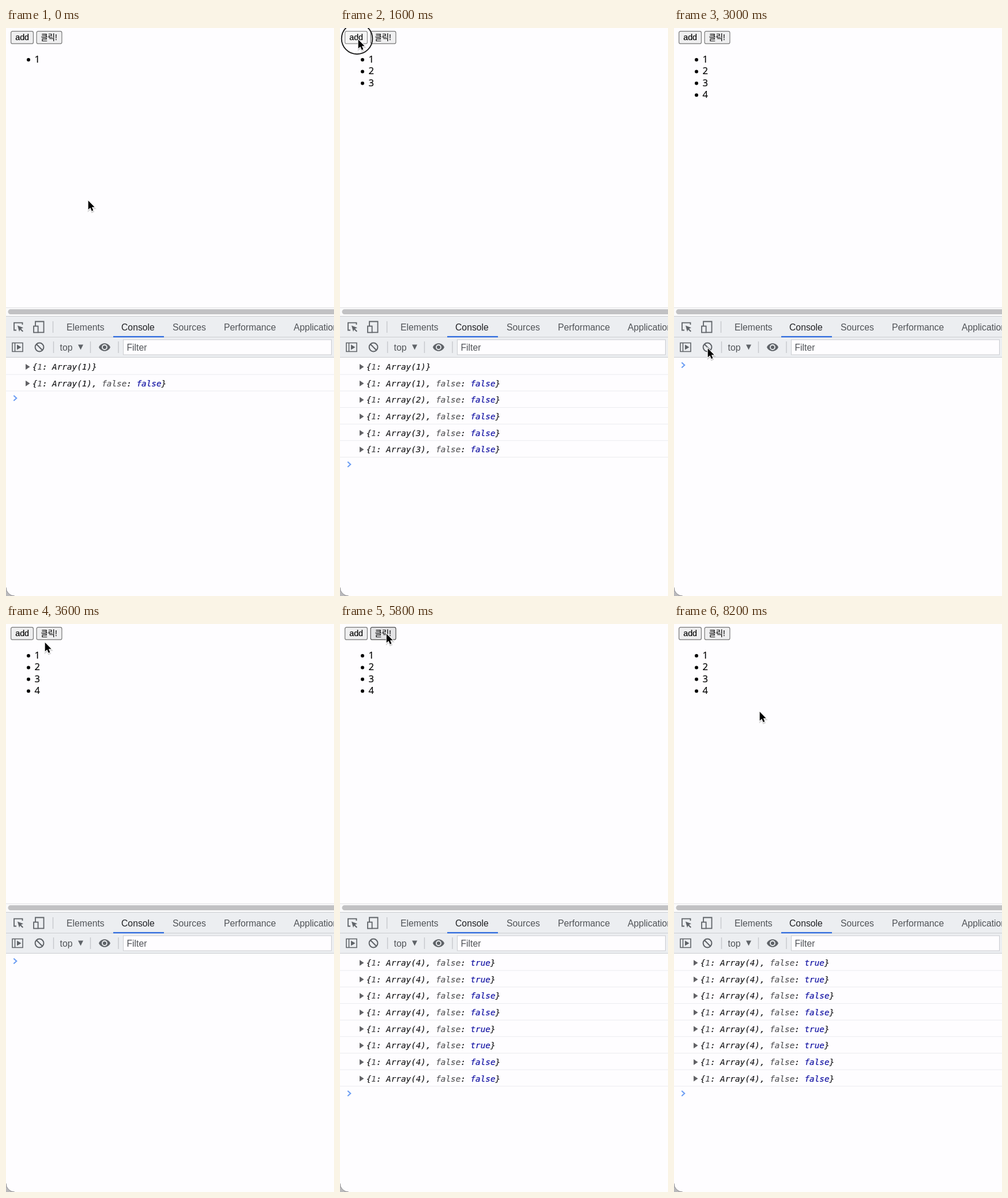
These frames come from a looping animation (569x984 px, 8300 ms). An HTML page:

```html
<!DOCTYPE html>
<html lang="ko">
<head>
<meta charset="utf-8">
<title>Console demo</title>
<style>
  html, body { margin: 0; width: 100%; height: 100%; overflow: hidden; background: #fefdff; }
  svg { display: block; width: 100vw; height: 100vh; }
  text { white-space: pre; }
  .ui { font: 15.75px "Liberation Sans", Arial, sans-serif; fill: #505357; }
  .ui .active { fill: #202124; }
  .btn { font: 14.3px "Liberation Sans", Arial, sans-serif; }
  .btn text { fill: #000; stroke: #000; stroke-width: .15; }
  .ko { font: 500 13.2px "Noto Sans CJK KR", "Noto Sans CJK", sans-serif; }
  .li { font: 16.5px "Open Sans", "Noto Sans", sans-serif; fill: #000; }
  .li text { stroke: #000; stroke-width: .2; }
  .log { font: italic 14.3px "DejaVu Sans Mono", monospace; fill: #1c1c1e; stroke: #1c1c1e; stroke-width: .2; }
  .key { fill: #565659; stroke: #565659; }
  .val { fill: #1010a2; stroke: #1010a2; }
  .icon { fill: none; stroke: #5f6368; stroke-width: 1.8; }
  .icon .solid { fill: #5f6368; stroke: none; }
</style>
</head>
<body>
<svg viewBox="0 0 569 984" preserveAspectRatio="none">
  <defs><path id="arrow" d="M0 0V15.5L3.6 12.2L6.1 18L8.7 16.9L6.2 11.2H10.9Z"/></defs>
  <rect width="569" height="984" fill="#fefdff"/>

  <g class="btn">
    <rect id="add" x="8.6" y="5.6" width="38.8" height="21.6" rx="2.8"/>
    <text x="16.2" y="21">add</text>
    <rect id="toggle" x="53.1" y="5.6" width="43.8" height="21.6" rx="2.8"/>
    <text class="ko" x="60.6" y="20.8">클릭!</text>
  </g>
  <g id="items" class="li"></g>

  <path d="M0 484.5H569" stroke="#e3e3e6"/>
  <rect y="485" width="569" height="14" fill="#fafafb"/>
  <rect id="thumb" x="3.5" y="487.3" width="580" height="8.6" rx="4.3"/>

  <rect y="499" width="569" height="72" fill="#eceef1"/>
  <path d="M0 499.5H569M0 535.5H569M0 570.5H569" stroke="#cbcdd1"/>
  <path d="M186 534.9H274" stroke="#2a68dc" stroke-width="2.2"/>
  <path d="M81.5 508V528M82.5 543V563M146.5 543V563M195 543V563" stroke="#c6c8cc" stroke-width="1.4"/>

  <g class="icon">
    <path d="M18 523.5H14V510.7H28.5V514"/>
    <path class="solid" d="M20 515.5L30 519.3L26 521L30 525L28.6 526.5L24.5 522.4L23 526Z"/>
    <path d="M51 516V508.5H65.5V527.3H56"/>
    <rect x="48" y="516.5" width="7.6" height="11"/>
    <path d="M11 545.5H29V560.5H11ZM15.5 545.5V560.5" stroke-width="1.6"/>
    <path class="solid" d="M19 548.5L26.5 553L19 557.5Z"/>
    <circle cx="58" cy="553" r="7.4" stroke-width="2"/>
    <path d="M52.8 547.8L63.2 558.2" stroke-width="2"/>
    <path class="solid" d="M161 553C164.5 544 177.5 544 181 553C177.5 562 164.5 562 161 553Z"/>
    <circle cx="171" cy="553" r="4" fill="#5f6368" stroke="#eceef1"/>
    <path class="solid" d="M125 548.5H134L129.5 557.5Z"/>
  </g>
  <rect x="203.5" y="540" width="361" height="26" fill="#fefdff" stroke="#cbcdd1"/>
  <g class="ui">
    <text x="105" y="523.5">Elements</text>
    <text class="active" x="200" y="523.5">Console</text>
    <text x="289" y="523.5">Sources</text>
    <text x="378" y="523.5">Performance</text>
    <text x="499" y="523.5">Application</text>
    <text x="93.6" y="558.5">top</text>
    <text x="209.5" y="558.5">Filter</text>
  </g>

  <g id="logs"></g>
  <path id="prompt" d="M13.3 -4.5L18.3 0L13.3 4.5" fill="none" stroke="#6a9cf3" stroke-width="2"/>
  <path d="M0 969A15 15 0 0 0 15 984H0Z" fill="#b9b9bc"/>
  <path d="M0 969A15 15 0 0 0 15 984" fill="none" stroke="#88888b"/>

  <circle id="ring" r="26.8" fill="none" stroke="#1c1c1c" stroke-width="1.9"/>
  <g id="cursor">
    <use href="#arrow" x="1" y="4" opacity=".16" stroke="#000" stroke-width="2.5"/>
    <use href="#arrow" x=".7" y="2" stroke="#fff" stroke-width="2" paint-order="stroke"/>
  </g>
</svg>
<script>
const LOOP = 8300, STEP = 100, ROW = 28.65;
const RING = 100, HOLD = 200;
const $ = id => document.getElementById(id);

// Pointer stops: time, x, y
const stops = [
  [100, 142, 297], [700, 31, 18], [1850, 31, 18], [2500, 95, 494],
  [2800, 58, 553], [3100, 58, 553], [3600, 67, 30], [3750, 80, 15],
  [6800, 80, 15], [7700, 148, 150]
];
// Mouse presses: time, control
const clicks = [
  [800, 'add'], [1200, 'add'], [1600, 'add'], [2900, 'clear'],
  [3900, 'toggle'], [4200, 'toggle'], [4500, 'toggle'], [5500, 'toggle']
];

function pointer(t) {
  const next = stops.findIndex(s => t < s[0]);
  if (next < 1) return stops.at(next).slice(1);
  const [t0, x0, y0] = stops[next - 1], [t1, x1, y1] = stops[next];
  const p = (t - t0) / (t1 - t0), e = p * p * (3 - 2 * p);
  return [x0 + (x1 - x0) * e, y0 + (y1 - y0) * e];
}

function pageState(t) {
  const s = { count: 1, on: false, logs: [[1], [1, false]], pressed: '', ring: false };
  for (const [down, target] of clicks) {
    if (t < down) break;
    if (t < down + RING) s.ring = true;
    const delay = target === 'clear' ? RING : HOLD;
    if (t < down + delay) { s.pressed = target; continue; }
    if (target === 'clear') { s.logs = []; continue; }
    if (target === 'add') s.count++;
    else s.on = !s.on;
    s.logs.push([s.count, s.on], [s.count, s.on]);
  }
  return s;
}

function item(_, i) {
  const y = 60 + i * 20.4;
  return `<circle cx="39" cy="${y - 5}" r="3"/><text x="49.5" y="${y}">${i + 1}</text>`;
}

function logRow([count, flag], i) {
  const y = 587 + i * ROW, line = 600.2 + i * ROW;
  const tail = flag === undefined ? '' :
    `, <tspan class="key">false</tspan>: <tspan class="val">${flag}</tspan>`;
  return `<path d="M34 ${y - 5}L41.5 ${y}L34 ${y + 5}Z" fill="#626266"/>
    <text class="log" x="45.7" y="${y + 5}">{<tspan class="key">1</tspan>: Array(${count})${tail}}</text>
    <path d="M0 ${line}H569" stroke="#ebebef"/>`;
}

function paintButton(id, x, y, pressed) {
  const b = $(id), left = +b.getAttribute('x'), width = +b.getAttribute('width');
  const over = x >= left && x <= left + width && y >= 5 && y <= 28;
  const [fill, stroke] = pressed === id ? ['#f5f5f5', '#8d8d8d']
    : over ? ['#e3e3e5', '#4f4f4f'] : ['#efeff0', '#767676'];
  b.setAttribute('fill', fill);
  b.setAttribute('stroke', stroke);
  b.setAttribute('stroke-width', 1.2);
}

let last = -1;
function draw(time) {
  const t = Math.floor(time % LOOP / STEP) * STEP;
  if (t === last) return;
  last = t;
  const [x, y] = pointer(t), s = pageState(t);
  paintButton('add', x, y, s.pressed);
  paintButton('toggle', x, y, s.pressed);
  $('items').innerHTML = Array.from({ length: s.count }, item).join('');
  $('logs').innerHTML = s.logs.map(logRow).join('');
  $('prompt').setAttribute('transform', `translate(0 ${584 + s.logs.length * ROW})`);
  $('thumb').setAttribute('fill', y > 485 && y < 499 ? '#7f7f80' : '#c1c1c3');
  $('cursor').setAttribute('transform', `translate(${x} ${y})`);
  $('ring').setAttribute('transform', `translate(${x - 1.5} ${y + 0.5})`);
  $('ring').setAttribute('visibility', s.ring ? 'visible' : 'hidden');
}

const start = performance.now();
function tick() {
  draw(performance.now() - start);
  requestAnimationFrame(tick);
}
tick();
</script>
</body>
</html>
```
